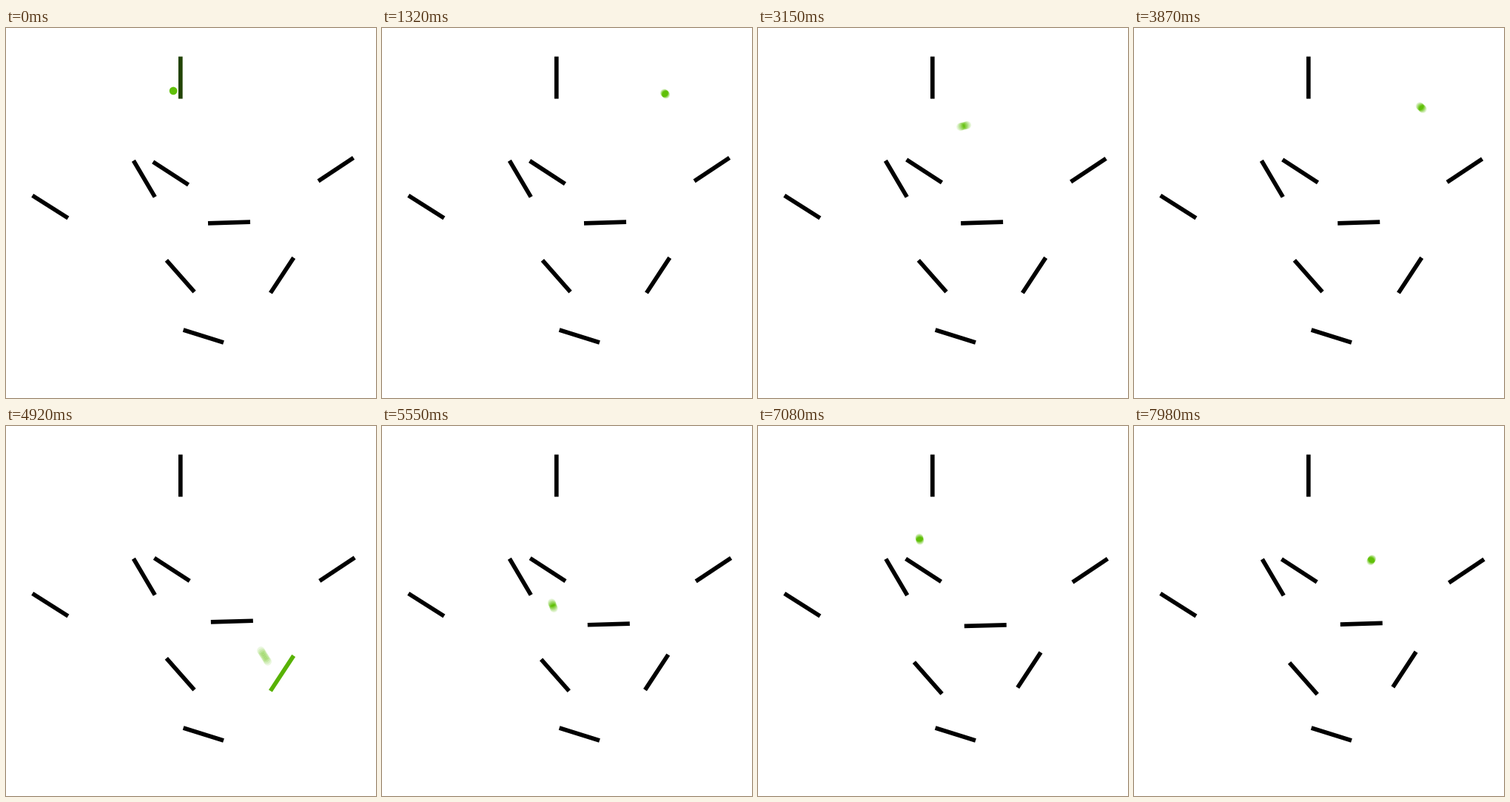
Animation of 500x500 px, one loop 8000 ms. Source, as an HTML page with a canvas:

```html
<!DOCTYPE html>
<html lang="en">
<head>
<meta charset="utf-8">
<title>Bouncing ball</title>
<style>
  html, body { margin: 0; width: 100%; height: 100%; overflow: hidden; background: #fff; }
  canvas { display: block; width: 500px; height: 500px; }
</style>
</head>
<body>
<canvas id="stage" width="500" height="500"></canvas>
<script>
const LOOP = 8, STEP = 0.03, GRAVITY = 1000;
const HOLD = 0.04, FADE = 0.16, SHUTTER = 0.03, SAMPLES = 8;
const RADIUS = 5.4, BAR_LENGTH = 57, BAR_WIDTH = 5.7, CONTACT = 8.5;
const ctx = document.getElementById('stage').getContext('2d');

// A bar has a centre, an angle in degrees and slow slides.
const slide = (from, to, dx, dy) => ({ from, to, dx, dy });
const bar = (x, y, degrees, ...slides) => ({ x, y, angle: degrees * Math.PI / 180, slides });

const top_ = bar(235.8, 67.1, 90);
const upper = bar(222.6, 196.4, 33, slide(0.4, 2.4, 2, -3), slide(3.9, 8, -1.3, 2));
const right = bar(445.8, 191.2, -33.6, slide(2, 8, 3.5, 4.8));
const middle = bar(301.5, 263, -1.6,
  slide(2.4, 6.2, 5.8, 0), slide(4.75, 6.2, 0, 9), slide(6.2, 8, 0, -4.8));
const lowRight = bar(373.1, 334.2, -56.7, slide(4.9, 7.4, -7.6, -5.2));
const lowLeft = bar(235.7, 335.3, 48.6, slide(4.9, 7.4, -6.8, 6));
const left = bar(186.8, 203.8, 59.5, slide(6.2, 8, 1, 0.8));
const floor = bar(266.8, 416.5, 17.5);
const far = bar(59.8, 241.6, 32.3);
const bars = [top_, upper, right, middle, lowRight, lowLeft, left, floor, far];

const clamp = v => Math.min(1, Math.max(0, v));
const mix = (a, b, p) => a + (b - a) * p;

function centre(b, t) {
  let { x, y } = b;
  for (const s of b.slides) {
    const p = clamp((t - s.from) / (s.to - s.from));
    x += s.dx * p;
    y += s.dy * p;
  }
  return { x, y };
}

// The ball touches a bar at a distance along it from the centre.
function hit(time, b, along, side = 1) {
  const c = centre(b, time), cos = Math.cos(b.angle), sin = Math.sin(b.angle);
  return {
    time, bar: b,
    x: c.x + along * cos + side * CONTACT * sin,
    y: c.y + along * sin - side * CONTACT * cos
  };
}

const hits = [
  hit(-0.14, top_, 25, -1),
  hit(0.432, upper, -5.7),
  hit(0.935, right, -25.5),
  hit(1.994, middle, 16),
  hit(2.946, upper, -28),
  hit(3.59, right, -9),
  hit(4.72, lowLeft, 8.4),
  hit(4.88, lowRight, -5.4),
  hit(4.993, middle, 18, -1),
  hit(5.2, floor, 1.5),
  hit(5.88, left, -2),
  hit(6.64, upper, -31),
  hit(7.21, upper, -6),
  hit(7.694, middle, -10),
  hit(8.62, lowRight, 28)
];

// Free fall from one contact to the next.
function ballAt(t) {
  const i = hits.findIndex(h => h.time > t), a = hits[i - 1], b = hits[i];
  const u = t - a.time, total = b.time - a.time, p = u / total;
  return { x: mix(a.x, b.x, p), y: mix(a.y, b.y, p) - GRAVITY / 2 * u * (total - u) };
}

function glow(b, t) {
  const levels = hits
    .filter(h => h.bar === b && h.time <= t)
    .map(h => clamp(1 - (t - h.time - HOLD) / FADE));
  return Math.max(0, ...levels);
}

function drawBall(t) {
  // Summed exposures give the motion blur.
  ctx.globalCompositeOperation = 'lighter';
  ctx.globalAlpha = 1 / SAMPLES;
  ctx.fillStyle = '#5cbc06';
  for (let i = 0; i < SAMPLES; i++) {
    const { x, y } = ballAt(t + SHUTTER * ((i + 0.5) / SAMPLES - 0.5));
    ctx.beginPath();
    ctx.arc(x, y, RADIUS, 0, Math.PI * 2);
    ctx.fill();
  }
  ctx.globalCompositeOperation = 'source-over';
  ctx.globalAlpha = 1;
}

function drawBar(b, t) {
  const { x, y } = centre(b, t), level = glow(b, t);
  const dx = Math.cos(b.angle) * BAR_LENGTH / 2, dy = Math.sin(b.angle) * BAR_LENGTH / 2;
  ctx.strokeStyle = `rgb(${88 * level}, ${178 * level}, ${4 * level})`;
  ctx.lineWidth = BAR_WIDTH;
  ctx.beginPath();
  ctx.moveTo(x - dx, y - dy);
  ctx.lineTo(x + dx, y + dy);
  ctx.stroke();
}

const start = performance.now();

function frame(now) {
  const elapsed = Math.max(0, now - start) / 1000 % LOOP;
  const t = Math.floor(elapsed / STEP + 1e-6) * STEP;
  ctx.clearRect(0, 0, 500, 500);
  drawBall(t);
  for (const b of bars) drawBar(b, t);
  requestAnimationFrame(frame);
}
frame(start);
</script>
</body>
</html>
```
